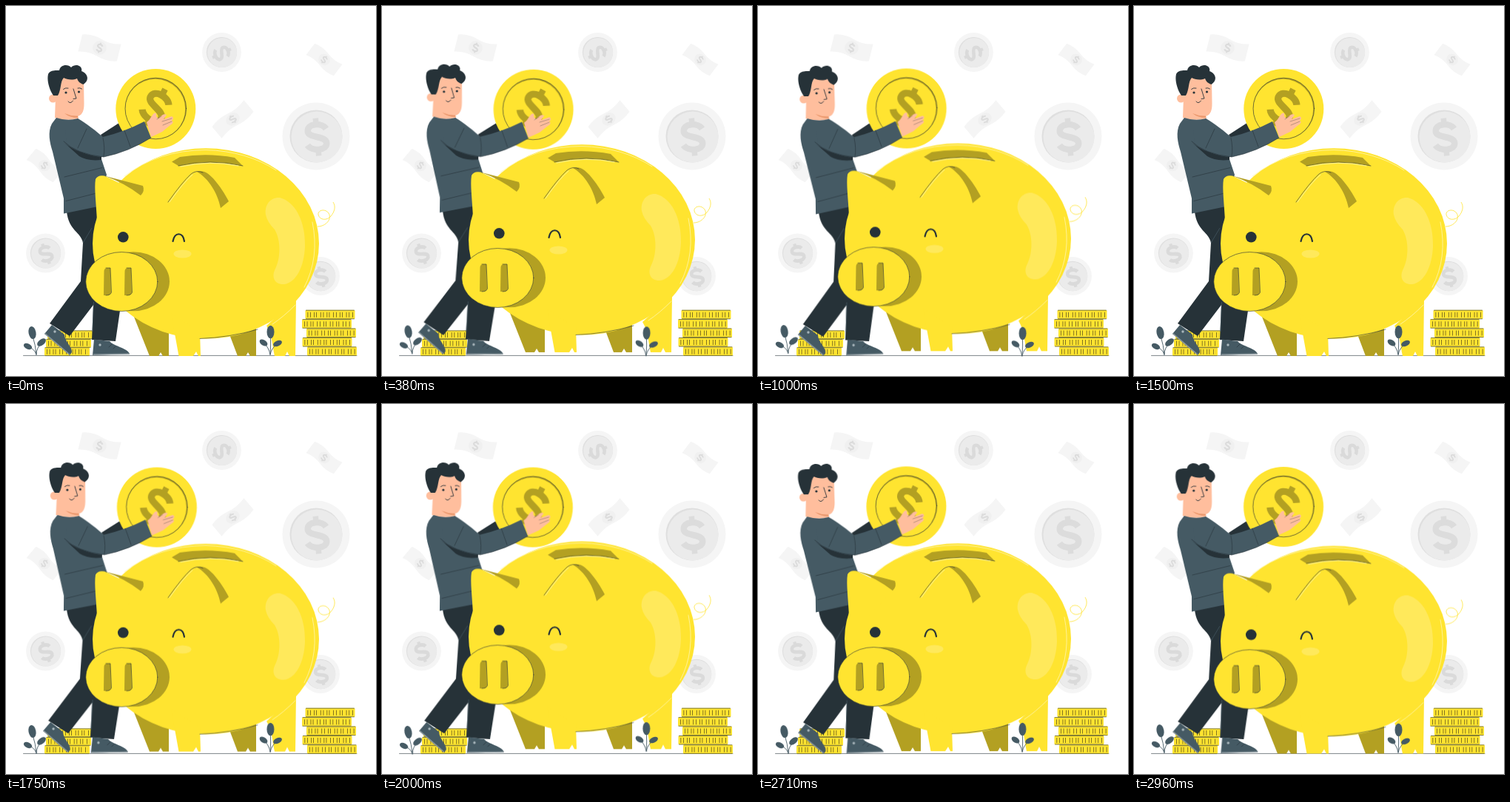
Recreate the animation shown at these times as an HTML page. Size 500 by 500 pixels, loop 3000 ms.

```html
<!DOCTYPE html>
<html lang="en">
<head>
<meta charset="utf-8">
<title>Piggy bank</title>
<style>
  html, body { margin: 0; width: 100%; height: 100%; overflow: hidden; background: #fff; }
  svg { display: block; width: 100%; height: 100%; }
  .yellow { fill: #ffe430; }
  .shade { fill: #b3a022; }
  .dark { fill: #263238; }
  .cloth { fill: #455a64; }
  .skin { fill: #ffbe9d; }
  .gleam { fill: #ffe95b; }
  .line { fill: none; stroke: #263238; stroke-width: .6; stroke-linecap: round; stroke-linejoin: round; }
  .face { stroke-width: .9; }
  .sole { fill: none; stroke: #8a979d; stroke-width: 1.6; }
  .shine { fill: none; stroke: #fff6b0; stroke-width: .8; stroke-linecap: round; }
  .ridge { fill: none; stroke: #4d451a; stroke-width: 7; stroke-dasharray: .7 3 .7 4.2 .7 2.4 .7 5; }
  .pig { animation: float 1.5s linear infinite; }
  .man { transform-origin: 155px 276px; animation: sway 1.5s linear infinite; }
  .plants { transform-origin: 198px 452px; animation: sway 3s linear infinite; }
  @keyframes float { 50% { transform: translateY(-10px); } }
  @keyframes sway {
    0%, 100% { transform: rotate(0deg); }
    25% { transform: rotate(1deg); }
    75% { transform: rotate(-1deg); }
  }
</style>
</head>
<body>
<svg viewBox="0 0 500 500" xmlns="http://www.w3.org/2000/svg">
  <defs>
    <g id="dollar" fill="none" stroke-width="8.500">
      <path d="M13-10C8-19-12-20-12-8.500C-12 1 12-1 12 9C12 20-9 19-14 10"/>
      <path d="M0-25.500V-15M0 15V25.500" stroke-width="7.500"/>
    </g>
    <g id="bill">
      <path fill="#f5f5f5" d="M-26-11Q-13-15 0-11T26-11V11Q13 15 0 11T-26 11Z"/>
      <ellipse rx="9" ry="8.500" fill="#f0f0f0"/>
      <use href="#dollar" transform="scale(.25)" stroke="#dcdcdc"/>
    </g>
    <g id="pale">
      <circle r="45.500" fill="#f5f5f5"/>
      <circle r="35.500" fill="#dfdfdf"/>
      <circle cx="1" cy="1" r="34.500" fill="#ebebeb"/>
    </g>
    <g id="slab">
      <rect class="yellow" width="67" height="12.300" rx="1.500"/>
      <path class="ridge" d="M3 6.500H65"/>
      <path class="line" d="M1 .4H66M1 12H66"/>
    </g>
    <g id="slabShort">
      <rect class="yellow" width="61" height="11.500" rx="1.500"/>
      <path class="ridge" d="M3 6H59"/>
      <path class="line" d="M1 .4H60M1 11.300H60"/>
    </g>
  </defs>

  <!-- Backdrop -->
  <use href="#bill" transform="translate(126.500 56.500) rotate(14) scale(1.040 1.080)"/>
  <use href="#bill" transform="translate(430 72.500) rotate(37) scale(.9 .88)"/>
  <use href="#bill" transform="translate(306.500 153) rotate(-40) scale(1.080 .92)"/>
  <use href="#bill" transform="translate(52 215.500) rotate(40) scale(.9)"/>
  <use href="#pale" transform="translate(291.500 62.500) scale(.58)"/>
  <use href="#dollar" transform="translate(291.500 64) rotate(65) scale(.54)" stroke="#dadada"/>
  <use href="#pale" transform="translate(419 176)"/>
  <use href="#dollar" transform="translate(420.500 177) rotate(-5)" stroke="#dcdcdc"/>
  <use href="#pale" transform="translate(53.500 334) scale(.58)"/>
  <use href="#dollar" transform="translate(54 335) rotate(-20) scale(.56)" stroke="#dadada"/>
  <use href="#pale" transform="translate(425 365) scale(.57)"/>
  <use href="#dollar" transform="translate(426 366) rotate(-14) scale(.56)" stroke="#dadada"/>

  <!-- Ground and coin stacks -->
  <path class="line" d="M23.500 472.400H474"/>
  <use href="#slabShort" x="56" y="438.500"/>
  <use href="#slabShort" x="54" y="450"/>
  <use href="#slabShort" x="52" y="461.300"/>
  <use href="#slab" x="404.500" y="410.800"/>
  <use href="#slab" x="400" y="423.200"/>
  <use href="#slab" x="406" y="435.600"/>
  <use href="#slab" x="400.500" y="448"/>
  <use href="#slab" x="407" y="460.400"/>

  <g class="man">
    <path class="dark" d="M82 278L124 268L150 340L155 405L148 453L116 451L118 404L86 446L59 429L101 372L104 320C101 305 85 304 82 278Z"/>
    <path fill="none" stroke="#455a64" stroke-width=".7" d="M104 320L116 300M118.500 400L117 440"/>
    <path class="cloth" d="M62 431L79 444C79 453 90 461 89 468L86 472L52 443Z"/>
    <path class="sole" d="M52.500 442.500L86 471"/>
    <circle cx="66" cy="440" r="1.700" fill="#a9b6bc"/>
    <path class="cloth" d="M119 450.500L140 453C146 460 164 462 167 470L117 472Z"/>
    <path class="sole" d="M117.500 471L167 470"/>
    <circle cx="127" cy="458" r="1.700" fill="#a9b6bc"/>
    <path class="line" d="M139 461L143 457M145 463L148 460"/>

    <path class="dark" d="M128 174L152 158.500L160 170L135 186Z"/>
    <circle class="yellow" cx="202.300" cy="139" r="54"/>
    <circle class="shade" cx="202.300" cy="138.500" r="41.300"/>
    <circle class="yellow" cx="201.700" cy="139.300" r="40.500"/>
    <circle class="line" cx="202.300" cy="138.500" r="41.300"/>
    <use href="#dollar" transform="translate(202.500 137) rotate(27) scale(1.080)" stroke="#b3a022"/>

    <path class="skin" d="M67 122L66 151Q82 156 98 152L97 149C104 147 105.500 140 105.500 132L105 100L72 94Z"/>
    <circle class="skin" cx="63.500" cy="125" r="5.500"/>
    <path fill="#eb996e" d="M79 145Q88 149 97 148.500L97.500 151Q86 151 79 145Z"/>
    <path class="dark" d="M64 121C58 112 55 100 57 92C60 86 68 87 72 87C73 79 84 78 88 83C94 77 104 81 102 88C111 91 113 101 104.500 106C99 104 97 101 96 98C89 101 82 99 78 97C73 102 75 113 70 121Z"/>
    <circle class="dark" cx="81" cy="117" r="1.600"/>
    <circle class="dark" cx="98.500" cy="116" r="1.600"/>
    <path class="line face" d="M77.500 112.500Q80 110 84 111M97 111Q100 110 102.500 112M91 112L95 125L91 125.500M84 129Q87 133 90.500 128"/>

    <path class="cloth" d="M68 151Q83 156 97 152L120 172L128 204L136 228L124 271L78 280.500L78 260L63 197C59 185 56 170 62 159Z"/>
    <path class="dark" d="M79 185Q98 201 129 202L129 208Q110 210 99 203Z"/>
    <path class="cloth" d="M97 152C108 158 123 170 131 177Q160 170 187 156L196 178Q166 197 132 204C112 204 95 194 82 187L80 168Z"/>
    <path class="line" d="M109 166L97 192M131 178Q134 192 132 203M160 168L168 190M79 231L130 218.500M81 263.500L122 253M78 183Q95 200 132 204Q166 197 196 178"/>
    <path class="skin" d="M190 157C194 155 196 149 200 145Q204 143 203 149L206 152Q213 144 217 147L213 153L224 149Q228 151 224 155Q228 157 222 161L211 170Q203 174 196 177Z"/>
    <path class="line" stroke-opacity=".55" d="M211 156L224 152M212 161L224 156M204 153L210 149"/>
  </g>

  <g class="pig">
    <path fill="none" stroke="#ffe430" stroke-width=".8" d="M421 298C432 298 441 288 436 280C431 273 421 276 422 282C424 290 434 290 439 284C444 278 446 271 442 265"/>
    <path class="shade" d="M167 405L194 473H206L209 468L212 473H220V430ZM299 436L313 473H324L327 468L330 473H338V430Z"/>
    <ellipse class="yellow" cx="270" cy="321" rx="153" ry="128.700"/>
    <path class="yellow" d="M223 415L233.500 473H253L257 467L260 473H263L262 440ZM352 432C360 445 360 460 363 473H377L380 467L383 473H391L392 396Z"/>
    <path class="line" d="M262 449.500Q302 448 340 437"/>
    <path class="shine" d="M160 230Q205 195 270 194.500Q325 196 365 222M414 292Q424 340 403 380M391 404Q375 420 360 430"/>

    <path class="shade" d="M224 210.500L235 204Q272 198 309 205L320 216Q276 206 233 216Z"/>
    <path class="line" d="M233 216Q276 206 320 216"/>
    <path class="shine" d="M236 217Q276 208 314 216"/>

    <path class="yellow" d="M123 290C122 268 119 246 121 234Q124 228 133 229.500L184 254L150 290Z"/>
    <path class="shade" d="M133 229.500L185 243Q188 250 182 256Q160 239 133 229.500Z"/>
    <path class="shade" d="M258 224C268 221 274 227 280 233C289 243 297 256 301 264L290 273C286 253 274 233 258 224Z"/>
    <path class="line" d="M219 265Q238 238 250 227Q258 221 266 225"/>
    <path class="shine" d="M221 265Q240 238 252 228"/>

    <path class="gleam" d="M351 282C349 268 358 258 370 259C390 264 405 290 404 325C403 352 392 374 376 376C363 377 358 366 364 355C371 341 372 317 363 302Q353 292 351 282Z"/>
    <circle class="dark" cx="158.300" cy="312.300" r="7.300"/>
    <path fill="none" stroke="#263238" stroke-width="2.200" stroke-linecap="round" d="M225.500 318C228 305 239 305 241 318"/>
    <ellipse class="gleam" cx="238.500" cy="335" rx="12" ry="5.500"/>

    <ellipse class="shade" cx="172" cy="372.300" rx="49" ry="40"/>
    <ellipse class="yellow" cx="156.300" cy="372.500" rx="48.500" ry="40"/>
    <ellipse class="line" cx="156.300" cy="372.500" rx="48.500" ry="40"/>
    <g id="nostril">
      <path class="shade" d="M132.500 358Q133 354 137 354H141L142 387Q141 391 137 391H132Z"/>
      <path class="line" d="M135 354H141L142.500 387Q141 391 135 391"/>
    </g>
    <use href="#nostril" x="28"/>
  </g>

  <g class="plants">
    <path fill="none" stroke="#455a64" stroke-width=".9" d="M41 472Q40 458 36 446M41 471Q38 462 28 460M41 471Q41 462 49 454M357 472Q358 458 357.500 444M357 471Q355 461 348 455M357 471Q359 461 368 456"/>
    <g class="cloth">
      <ellipse transform="translate(35.500 441.500) rotate(-10)" rx="5" ry="8.700"/>
      <ellipse transform="translate(29.500 460) rotate(25)" rx="6" ry="3.700"/>
      <ellipse transform="translate(48 454.500) rotate(-38)" rx="6.800" ry="3.900"/>
      <ellipse transform="translate(357.500 440.500)" rx="5" ry="8.700"/>
      <ellipse transform="translate(348 455) rotate(35)" rx="6" ry="3.700"/>
      <ellipse transform="translate(367 456) rotate(-25)" rx="6.300" ry="3.700"/>
    </g>
  </g>
</svg>
</body>
</html>
```
